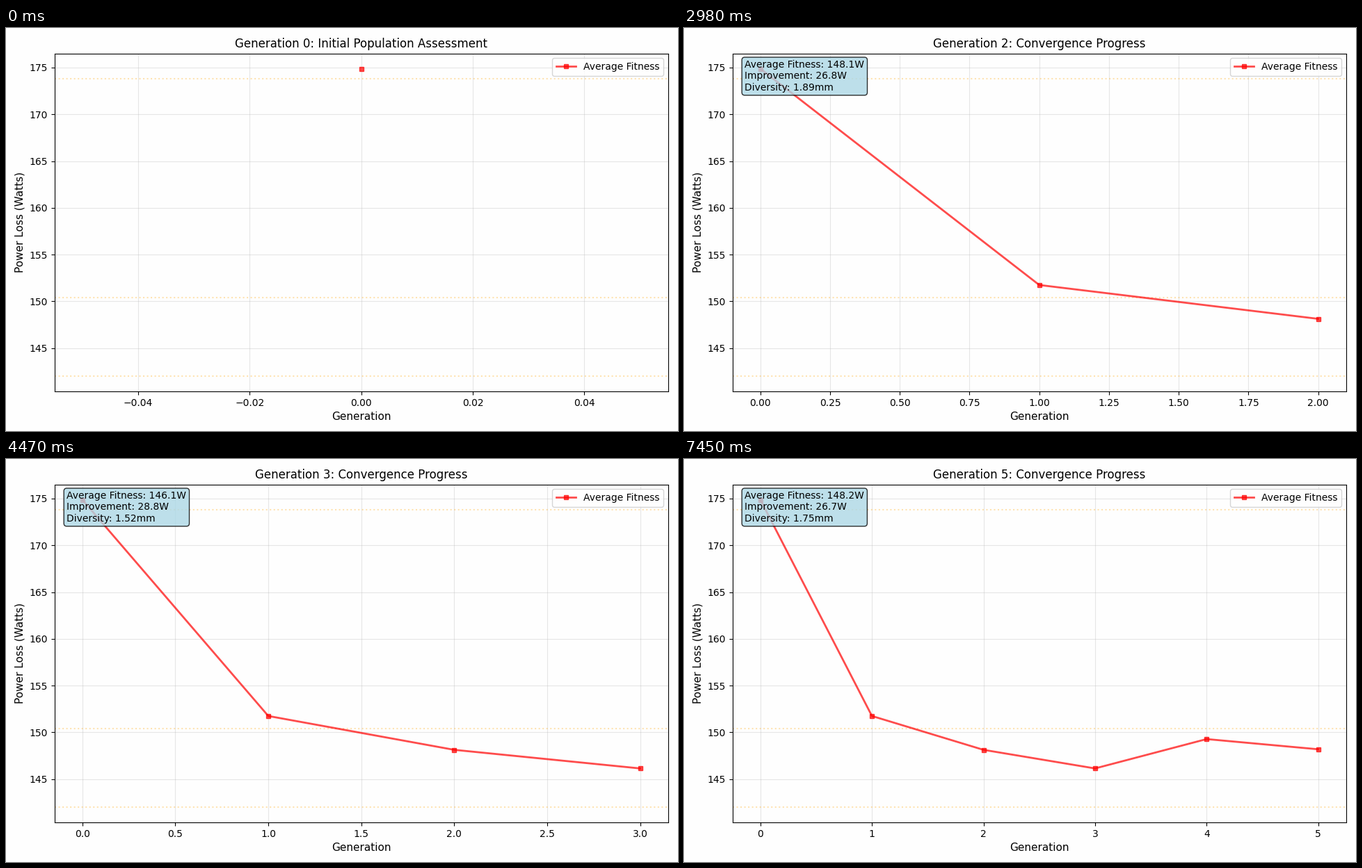
A matplotlib script for the animation above (8000 ms loop, 966 by 580 pixels).

```python
import matplotlib.pyplot as plt
from matplotlib.animation import FuncAnimation

W, H, DPI = 966, 580, 100
LEFT, RIGHT, TOP, BOTTOM = 69.7, 951.7, 36.5, 523.0
INTERVAL, FRAMES, HOLD = 50, 160, 30

FITNESS = [174.88, 151.74, 148.12, 146.13, 149.27, 148.18]
DIVERSITY = [None, 2.44, 1.89, 1.52, 2.84, 1.75]
LEVELS = [173.8, 150.42, 142.0]

plt.rcParams["font.family"] = "DejaVu Sans"
fig = plt.figure(figsize=(W / DPI, H / DPI), dpi=DPI, facecolor="#fefefe")
ax = fig.add_axes([LEFT / W, 1 - BOTTOM / H, (RIGHT - LEFT) / W, (BOTTOM - TOP) / H],
                  facecolor="#fefefe")

margin = 0.05 * (FITNESS[0] - LEVELS[-1])
ax.set_ylim(LEVELS[-1] - margin, FITNESS[0] + margin)
ax.set_xlabel("Generation", fontsize=11)
ax.set_ylabel("Power Loss (Watts)", fontsize=11)
ax.grid(True, alpha=0.3)

for level in LEVELS:
    ax.axhline(level, color="orange", linestyle=":", linewidth=1.5, alpha=0.3)
line, = ax.plot([], [], "rs-", linewidth=2, markersize=4, alpha=0.7,
                label="Average Fitness")
ax.legend(loc="upper right", fontsize=10)
title = ax.set_title("", fontsize=12)
info = ax.text(0.02, 0.98, "", transform=ax.transAxes, fontsize=10, va="top",
               bbox=dict(boxstyle="round", facecolor="lightblue", alpha=0.8))


def show_generation(gen):
    line.set_data(range(gen + 1), FITNESS[:gen + 1])
    pad = 0.05 * gen if gen else 0.055
    ax.set_xlim(-pad, gen + pad)
    stage = "Convergence Progress" if gen else "Initial Population Assessment"
    title.set_text(f"Generation {gen}: {stage}")
    info.set_visible(gen > 0)
    if gen:
        info.set_text(f"Average Fitness: {FITNESS[gen]:.1f}W\n"
                      f"Improvement: {FITNESS[0] - FITNESS[gen]:.1f}W\n"
                      f"Diversity: {DIVERSITY[gen]:.2f}mm")


def update(i):
    # Each generation holds for just under 1.5 s, then cuts to the next.
    show_generation(min((i + 1) // HOLD, len(FITNESS) - 1))
    return line, title, info


anim = FuncAnimation(fig, update, frames=FRAMES, interval=INTERVAL,
                     init_func=lambda: update(0), repeat=True,
                     repeat_delay=0, blit=False)
plt.show()
```
